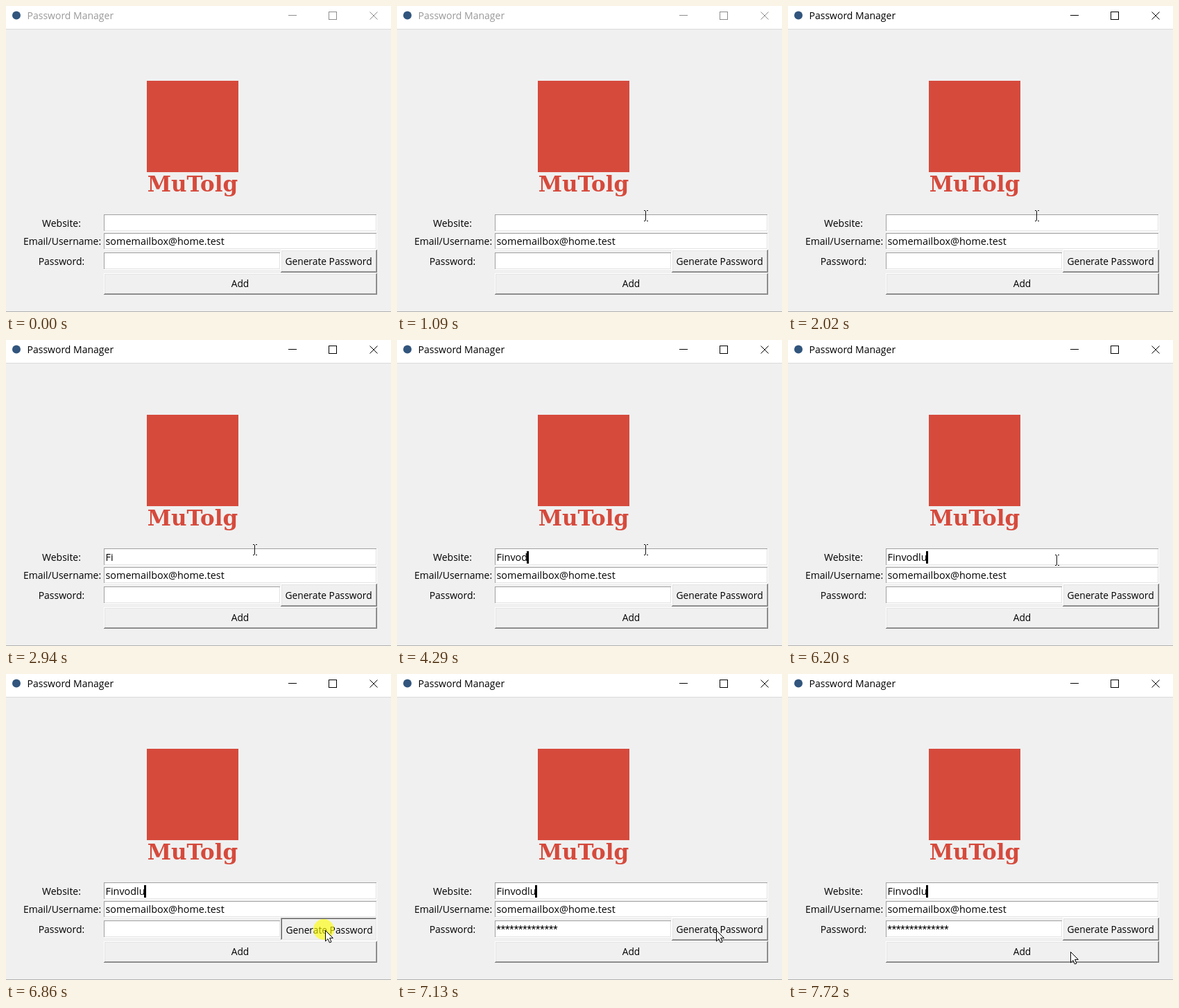
Write an HTML page that moves like this. It is 555 px wide and 442 px high and loops after 8000 ms.

```html
<!DOCTYPE html>
<html lang="en">
<head>
<meta charset="utf-8">
<title>Password Manager</title>
<style>
  html, body { margin: 0; width: 100%; height: 100%; overflow: hidden; background: #f0f0f0; }
  svg { display: block; width: 555px; height: 442px; }
  text { font: 14px "Open Sans", "Noto Sans", sans-serif; fill: #000; }
  .mid { text-anchor: middle; }
  .button { font-size: 13.8px; }
  .entry { font-size: 14.4px; }
  .stars { font: 14.6px Roboto, sans-serif; }
  .brand { font: bold 31px "DejaVu Serif", "Noto Serif", serif; fill: #d64a3c; }
  .crisp { shape-rendering: crispEdges; }
  .line { fill: none; stroke-width: 1; }
</style>
</head>
<body>
<svg viewBox="0 0 555 442">
  <rect width="555" height="442" fill="#f0f0f0"/>
  <rect width="555" height="33" fill="#fff"/>
  <rect y="33" width="555" height="1" fill="#dadada"/>
  <rect y="441" width="555" height="1" fill="#b0b0b0"/>
  <circle cx="15" cy="13.5" r="6" fill="#31557d"/>
  <text id="title" x="30.5" y="19">Password Manager</text>
  <g id="controls" class="line">
    <path class="crisp" d="M407 13.5h12M465.5 8.5h11v11h-11z"/>
    <path d="M524.5 8.5l11 11M535.5 8.5l-11 11"/>
  </g>

  <rect x="203" y="108" width="132" height="132" fill="#d64a3c"/>
  <text class="brand mid" x="269" y="268">MuTolg</text>

  <g id="frames" class="crisp"></g>
  <text class="mid" x="80" y="319">Website:</text>
  <text class="mid" x="81" y="345">Email/Username:</text>
  <text class="mid" x="80" y="374">Password:</text>
  <text id="site" class="entry" x="143.5" y="319"></text>
  <text class="entry" x="143.5" y="345">somemailbox@home.test</text>
  <text id="pass" class="stars" x="143.5" y="374"></text>
  <rect id="caret" class="crisp" y="305" width="3" height="18"/>
  <text id="generate" class="button mid" x="465" y="374">Generate Password</text>
  <text class="button mid" x="337.5" y="406">Add</text>

  <g id="pointer">
    <circle id="halo" cx="-2" cy="-1" r="15" fill="#ff0" fill-opacity=".62"/>
    <path id="beam" class="line crisp" stroke="#111"
      d="M-2.5 -6.5h2M1.5 -6.5h2M.5 -6v14M-2.5 8.5h2M1.5 8.5h2"/>
    <path id="arrow" d="M.5 .5V16L4 12.6 6.4 18 9 17 6.6 11.4H11.4Z" fill="#fff" stroke="#000"/>
  </g>
</svg>
<script>
const LOOP = 8000, TICK = 200 / 3;
const $ = id => document.getElementById(id);
const within = (t, spans) => spans.some(([a, b]) => t >= a && t < b);

// Two-pixel bevels: top-left outer and inner, bottom-right outer and inner.
const RAISED = ["#fff", "#e3e3e3", "#7c7c7c", "#a0a0a0"];
const SUNKEN = ["#a0a0a0", "#696969", "#fff", "#e3e3e3"];
const FIELD = ["#a0a0a0", "#fff", "#fff", "#e3e3e3"];

function bevel(x, y, w, h, fill, [tl, tlIn, br, brIn]) {
  const edge = (d, c) => `<path d="${d}" fill="none" stroke="${c}"/>`;
  const pair = (i, a, b) => {
    const l = x + i + .5, t = y + i + .5, r = x + w - i - .5, e = y + h - i - .5;
    return edge(`M${l} ${e}V${t}H${r}`, a) + edge(`M${l - .5} ${e}H${r}V${t - .5}`, b);
  };
  return `<rect x="${x}" y="${y}" width="${w}" height="${h}" fill="${fill}"/>`
    + pair(0, tl, br) + pair(1, tlIn, brIn);
}

const generateBox = look => bevel(396, 352, 139, 33, "#f0f0f0", look);
$("frames").innerHTML =
  bevel(141, 301, 394, 25, "#fff", FIELD) +
  bevel(141, 328, 394, 24, "#fff", FIELD) +
  bevel(141, 356, 255, 25, "#fff", FIELD) +
  bevel(141, 386, 394, 31, "#f0f0f0", RAISED) +
  `<g id="up">${generateBox(RAISED)}</g><g id="down">${generateBox(SUNKEN)}</g>`;

const SITE = "Finvodlu";
const KEYS = [2410, 2740, 3280, 3760, 3950, 4290, 5010, 5540];
const CARET = [[1420, 2020], [2280, 2940], [3210, 3820], [4150, 4750],
  [5010, 5600], [5930, 6520], [6860, 7430], [7720, LOOP]];
const CLICKS = [[1360, 1620], [6860, 7130]];
const PRESS = [[6860, 7060]];

// Pointer path: time, x, y
const PATH = [
  [330, 376, 290], [600, 371, 307], [800, 364, 310], [1066, 358, 302],
  [6060, 358, 302], [6200, 387, 317], [6400, 436, 347], [6600, 460, 370],
  [7340, 460, 370], [7500, 437, 385], [7667, 407, 401]
];

function pointerAt(time) {
  const t = Math.floor((time + 2) / TICK) * TICK + 1;
  if (t <= PATH[0][0]) return PATH[0].slice(1);
  const i = PATH.findIndex(p => p[0] > t);
  if (i < 0) return PATH[PATH.length - 1].slice(1);
  const [t0, x0, y0] = PATH[i - 1], [t1, x1, y1] = PATH[i];
  const k = (t - t0) / (t1 - t0);
  return [Math.round(x0 + (x1 - x0) * k), Math.round(y0 + (y1 - y0) * k)];
}

const show = (id, on) => $(id).setAttribute("visibility", on ? "visible" : "hidden");

function setText(id, value) {
  if ($(id).textContent !== value) $(id).textContent = value;
}

function draw(t) {
  const active = t >= 1360;
  $("title").style.fill = active ? "#000" : "#999";
  $("controls").setAttribute("stroke", active ? "#000" : "#8c8c8c");

  const typed = KEYS.filter(k => t >= k).length;
  setText("site", SITE.slice(0, typed));
  setText("pass", t >= 7060 ? "*".repeat(14) : "");
  const width = typed ? $("site").getComputedTextLength() : 0;
  $("caret").setAttribute("x", Math.round(142.2 + width));
  show("caret", within(t, CARET));

  const pressed = within(t, PRESS);
  show("up", !pressed);
  show("down", pressed);
  $("generate").setAttribute("transform", pressed ? "translate(1 1)" : "");

  const [x, y] = pointerAt(t), seen = t >= 330, overEntry = y < 352;
  $("pointer").setAttribute("transform", `translate(${x} ${y})`);
  show("halo", within(t, CLICKS));
  show("beam", seen && overEntry);
  show("arrow", seen && !overEntry);
}

const start = performance.now();
function frame() {
  draw((performance.now() - start) % LOOP);
  requestAnimationFrame(frame);
}
frame();
</script>
</body>
</html>
```
